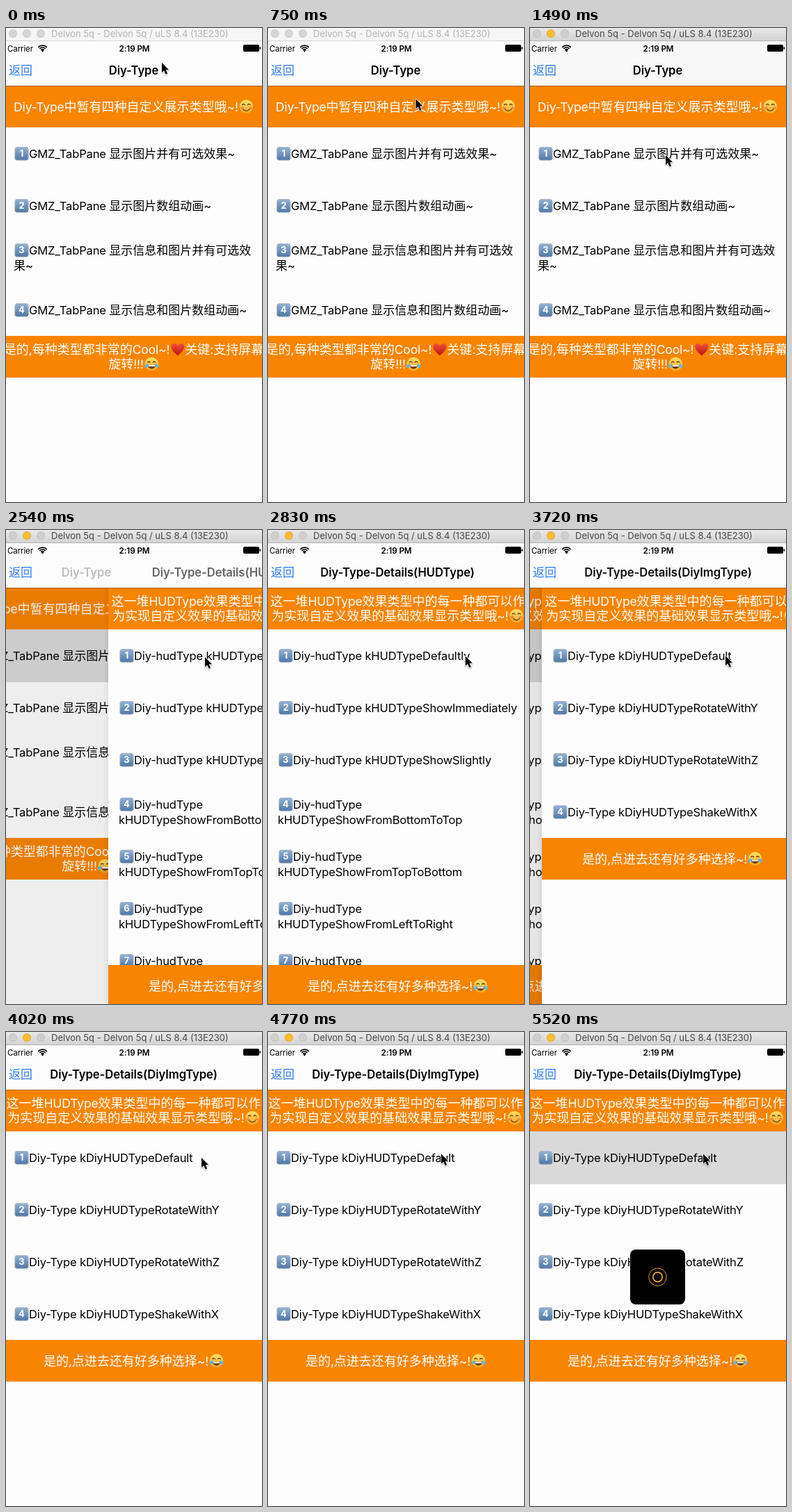
Recreate the animation shown at these times as an HTML page with a canvas. Size 368 by 682 pixels, loop 8 s.

```html
<!DOCTYPE html>
<html lang="zh-CN">
<head>
<meta charset="utf-8">
<title>Diy-Type</title>
<style>
html, body { margin: 0; width: 100%; height: 100%; overflow: hidden; background: #fdfdfd; }
canvas { display: block; width: 368px; height: 682px; }
</style>
</head>
<body>
<canvas id="stage" width="368" height="682"></canvas>
<script>
const ctx = document.getElementById('stage').getContext('2d');
const W = 368, H = 682, LOOP = 8000, TICK = 149;
const LEFT = -4, VIEW = 375, MID = 183.5, TOP = 83;
const ORANGE = '#f88400', PAPER = '#fdfdfd', TAU = Math.PI * 2;
const LATIN = 'Inter, "Liberation Sans", sans-serif';
const HAN = '"Noto Sans CJK SC", "Noto Sans CJK", sans-serif';
const RUNS = /[\u4e00-\u9fff]+|[😊😂❤①-⑦]|[^\u4e00-\u9fff😊😂❤①-⑦]+/gu;

const introHead = ['这一堆HUDType效果类型中的每一种都可以作', '为实现自定义效果的基础效果显示类型哦~!😊'];
const moreFoot = ['是的,点进去还有好多种选择~!😂'];

const home = {
  title: 'Diy-Type',
  head: ['Diy-Type中暂有四种自定义展示类型哦~!😊'],
  rows: [
    ['①GMZ_TabPane 显示图片并有可选效果~'],
    ['②GMZ_TabPane 显示图片数组动画~'],
    ['③GMZ_TabPane 显示信息和图片并有可选效', '果~'],
    ['④GMZ_TabPane 显示信息和图片数组动画~']
  ],
  foot: ['是的,每种类型都非常的Cool~!❤关键:支持屏幕', '旋转!!!😂'],
  footY: 443
};
const kinds = {
  title: 'Diy-Type-Details(HUDType)', slide: 340,
  head: introHead,
  rows: [
    ['①Diy-hudType kHUDTypeDefaultly'],
    ['②Diy-hudType kHUDTypeShowImmediately'],
    ['③Diy-hudType kHUDTypeShowSlightly'],
    ['④Diy-hudType', 'kHUDTypeShowFromBottomToTop'],
    ['⑤Diy-hudType', 'kHUDTypeShowFromTopToBottom'],
    ['⑥Diy-hudType', 'kHUDTypeShowFromLeftToRight'],
    ['⑦Diy-hudType', 'kHUDTypeShowFromRightToLeft']
  ],
  foot: moreFoot, footY: 626
};
const images = {
  title: 'Diy-Type-Details(DiyImgType)', slide: 268,
  head: introHead,
  rows: [
    ['①Diy-Type kDiyHUDTypeDefault'],
    ['②Diy-Type kDiyHUDTypeRotateWithY'],
    ['③Diy-Type kDiyHUDTypeRotateWithZ'],
    ['④Diy-Type kDiyHUDTypeShakeWithX']
  ],
  foot: moreFoot, footY: 443
};

function rect(x, y, w, h, color) {
  ctx.fillStyle = color;
  ctx.fillRect(x, y, w, h);
}

function disc(x, y, rx, ry, color) {
  ctx.fillStyle = color;
  ctx.beginPath();
  ctx.ellipse(x, y, rx, ry, 0, 0, TAU);
  ctx.fill();
}

function arc(x, y, r, from, to, color, width) {
  ctx.strokeStyle = color;
  ctx.lineWidth = width;
  ctx.beginPath();
  ctx.arc(x, y, r, from, to);
  ctx.stroke();
}

function box(x, y, w, h, r, color) {
  ctx.fillStyle = color;
  ctx.beginPath();
  ctx.roundRect(x, y, w, h, r);
  ctx.fill();
}

function fade(y0, y1, a, b) {
  const g = ctx.createLinearGradient(0, y0, 0, y1);
  g.addColorStop(0, a);
  g.addColorStop(1, b);
  return g;
}

function label(s, x, y, font, color, align = 'left', spacing = 0) {
  ctx.font = font;
  ctx.letterSpacing = spacing + 'px';
  ctx.fillStyle = color;
  ctx.textAlign = align;
  ctx.fillText(s, x, y);
  ctx.letterSpacing = '0px';
}

// Emoji are drawn around their own centre in a 20 px square.
function face(joy) {
  disc(0, 0, 9.8, 9.8, fade(-10, 10, '#ffe36a', '#f0a524'));
  const brown = '#6d3f12';
  for (const side of [-1, 1]) {
    if (!joy) disc(side * 6.3, 2, 2.4, 1.9, '#f58a4a');
    arc(side * 3.9, -1.4, 2.1, Math.PI * 1.1, Math.PI * 1.9, brown, 1.4);
  }
  if (joy) {
    ctx.fillStyle = brown;
    ctx.beginPath();
    ctx.arc(0, 1.4, 5.6, 0, Math.PI);
    ctx.fill();
    rect(-4.6, 1.6, 9.2, 1.9, '#fff');
    for (const side of [-1, 1]) {
      ctx.save();
      ctx.translate(side * 7.6, 2.6);
      ctx.rotate(side * -0.6);
      disc(0, 0, 1.9, 3.3, '#5db9ee');
      ctx.restore();
    }
  } else {
    arc(0, 0.6, 5.5, 0.5, Math.PI - 0.5, brown, 1.4);
  }
}

function heart() {
  ctx.fillStyle = fade(-9, 9, '#f4513c', '#b8140f');
  ctx.beginPath();
  ctx.moveTo(0, 9);
  ctx.bezierCurveTo(-4, 5, -9.5, 1, -9.5, -4);
  ctx.bezierCurveTo(-9.5, -9.5, -2, -10, 0, -5);
  ctx.bezierCurveTo(2, -10, 9.5, -9.5, 9.5, -4);
  ctx.bezierCurveTo(9.5, 1, 4, 5, 0, 9);
  ctx.fill();
}

function keycap(n) {
  box(-10, -9.5, 20, 19.5, 3.8, fade(-9, 10, '#a9b8ca', '#6f87a5'));
  box(-8.8, -8.3, 17.6, 17.1, 2.8, fade(-9, 9, '#94b1d3', '#5379a8'));
  label(n, 0, 4.7, '700 13px ' + LATIN, '#fff', 'center');
}

function emoji(ch, x, y) {
  ctx.save();
  ctx.translate(x, y);
  if (ch === '❤') heart();
  else if (ch === '😊' || ch === '😂') face(ch === '😂');
  else keycap(String(ch.charCodeAt(0) - 0x245f));
  ctx.restore();
}

// Sets one line of mixed Latin, Han and emoji; y is the middle of the line.
function line(s, x, y, size, color, centred) {
  const base = Math.round(y + size * 0.36);
  const runs = s.match(RUNS).map(t => {
    if (/^[😊😂❤①-⑦]/u.test(t)) return { t, pic: true, w: 22 };
    const han = /[\u4e00-\u9fff]/.test(t);
    const font = han ? `${size > 17 ? 300 : 400} ${size}px ${HAN}` : `400 ${size * 0.975}px ${LATIN}`;
    const gap = han ? 0 : -size * 0.0095;
    ctx.font = font;
    ctx.letterSpacing = gap + 'px';
    return { t, font, gap, w: ctx.measureText(t).width };
  });
  ctx.letterSpacing = '0px';
  if (centred) x -= runs.reduce((sum, r) => sum + r.w, 0) / 2;
  for (const r of runs) {
    if (r.pic) emoji(r.t, x + 11.5, y - 0.5);
    else label(r.t, x, base, r.font, color, 'left', r.gap);
    x += r.w;
  }
}

function lines(list, x, mid, pitch, size, color, centred) {
  list.forEach((s, i) => line(s, x, mid + (i - (list.length - 1) / 2) * pitch, size, color, centred));
}

function band(list, y) {
  rect(LEFT, y, VIEW, 60, ORANGE);
  lines(list, MID, y + 30.5, 21, 18, '#fff', true);
}

function panel(screen, dx, picked) {
  ctx.save();
  ctx.translate(Math.round(dx), 0);
  rect(LEFT, TOP, VIEW, H - TOP, PAPER);
  if (picked) rect(LEFT, 143, VIEW, 76, '#d9d9d9');
  screen.rows.forEach((row, i) => lines(row, 11, 181 + i * 75, 22, 17, '#000', false));
  band(screen.head, TOP);
  band(screen.foot, screen.footY);
  ctx.restore();
}

function title(screen, dx, alpha) {
  ctx.globalAlpha = alpha;
  label(screen.title, MID + dx, 67, '600 16.7px ' + LATIN, '#000', 'center', -0.1);
  ctx.globalAlpha = 1;
}

function windowBar(active) {
  rect(0, 0, W, 19, active ? fade(0, 18, '#e9e9e9', '#d3d3d3') : '#f6f6f6');
  rect(0, 18, W, 1, active ? '#b4b4b4' : '#d6d6d6');
  [10, 30, 50].forEach((x, i) => {
    const lit = active && i === 1;
    disc(x, 8, 6, 6, lit ? '#dfa023' : active ? '#bdbdbd' : '#c6c6c6');
    disc(x, 8, 5.3, 5.3, lit ? '#fdbd30' : active ? '#cfcfcf' : '#d5d5d5');
  });
  label('Delvon 5q - Delvon 5q / uLS 8.4 (13E230)', 65, 13, '400 13px ' + LATIN, active ? '#484848' : '#b3b3b3');
}

function statusBar() {
  label('Carrier', 2, 33.5, '400 11.5px ' + LATIN, '#000', 'left', -0.1);
  for (const r of [3.2, 6, 8.8]) arc(52.5, 34, r, Math.PI * 1.25, Math.PI * 1.75, '#000', 1.7);
  disc(52.5, 33, 1.3, 1.3, '#000');
  label('2:19 PM', 184.5, 33.5, '600 11.7px ' + LATIN, '#000', 'center', -0.1);
  box(341, 24, 23, 10, 2, '#000');
  box(364.6, 27.2, 1.6, 3.6, 0.8, '#000');
}

function cursor(x, y) {
  ctx.save();
  ctx.translate(x, y);
  ctx.beginPath();
  [[0, 0], [0, 14], [3.2, 11.2], [5.6, 16.6], [8.1, 15.5], [5.8, 10.3], [10, 10]]
    .forEach(p => ctx.lineTo(...p));
  ctx.closePath();
  ctx.shadowColor = 'rgba(0,0,0,.35)';
  ctx.shadowBlur = 2;
  ctx.shadowOffsetY = 1;
  ctx.lineWidth = 1.6;
  ctx.lineJoin = 'round';
  ctx.strokeStyle = '#fff';
  ctx.stroke();
  ctx.shadowColor = 'transparent';
  ctx.fillStyle = '#000';
  ctx.fill();
  ctx.restore();
}

// Pointer stops: tick, x, y
const path = [
  [2, 224, 50], [9, 195, 183], [11, 195, 183], [15, 286, 183],
  [17, 286, 183], [20, 283, 181], [21, 283, 181], [22, 281, 181],
  [29, 281, 181], [32, 249, 175.5]
];

function pointer(n) {
  if (n <= path[0][0]) return path[0].slice(1);
  for (let i = 1; i < path.length; i++) {
    const [n0, x0, y0] = path[i - 1], [n1, x1, y1] = path[i];
    if (n > n1) continue;
    const k = (n - n0) / (n1 - n0), e = k * k * (3 - 2 * k);
    return [x0 + (x1 - x0) * e, y0 + (y1 - y0) * e];
  }
  return path[path.length - 1].slice(1);
}

// Share of a push still to go, n ticks after it became visible
const rest = n => n < 0 ? 1 : n > 2 ? 0 : 0.403 * 0.139 ** n;

function push(from, to, left) {
  const done = 1 - left, edge = LEFT + Math.round(VIEW * left);
  panel(from, -0.3 * VIEW * done, true);
  rect(0, TOP, edge, H - TOP, `rgba(0,0,0,${0.1 * done})`);
  const g = ctx.createLinearGradient(edge - 8, 0, edge, 0);
  g.addColorStop(0, 'rgba(0,0,0,0)');
  g.addColorStop(1, 'rgba(0,0,0,.06)');
  rect(edge - 8, TOP, 8, H - TOP, g);
  panel(to, VIEW * left, false);
  title(from, -114 * done, left * left * 1.5);
  title(to, to.slide * left, done);
}

function hud(n) {
  const y = 313 + 47 * (n > 1 ? 0 : 0.13 ** n);
  box(144, y, 79, 79, 8, '#000');
  arc(MID, y + 39.5, 12.7, 0, TAU, '#e9a31f', 1);
  arc(MID, y + 39.5, 6.8, 0, TAU, '#f5ae25', 1.7);
}

function draw(time) {
  const n = Math.floor(time % LOOP / TICK + 0.05);
  const active = n >= 9;
  rect(0, 0, W, H, PAPER);
  rect(0, 19, W, 64, active && n < 17 ? '#f8f8f8' : '#fcfcfc');

  const first = rest(n - 17), second = rest(n - 24);
  if (first === 1) {
    panel(home, 0, false);
    title(home, 0, 1);
  } else if (first > 0) {
    push(home, kinds, first);
  } else if (second === 1) {
    panel(kinds, 0, false);
    title(kinds, 0, 1);
  } else if (second > 0) {
    push(kinds, images, second);
  } else {
    panel(images, 0, n >= 34);
    title(images, 0, 1);
  }

  rect(0, TOP, W, 1, 'rgba(0,0,0,.3)');
  label('返回', 4, 67, '400 17px ' + HAN, '#2f7cf6');
  statusBar();
  windowBar(active);
  if (n >= 35) hud(n - 35);
  cursor(...pointer(n));
}

const start = performance.now();
function loop() {
  draw(performance.now() - start);
  requestAnimationFrame(loop);
}
loop();
</script>
</body>
</html>
```
